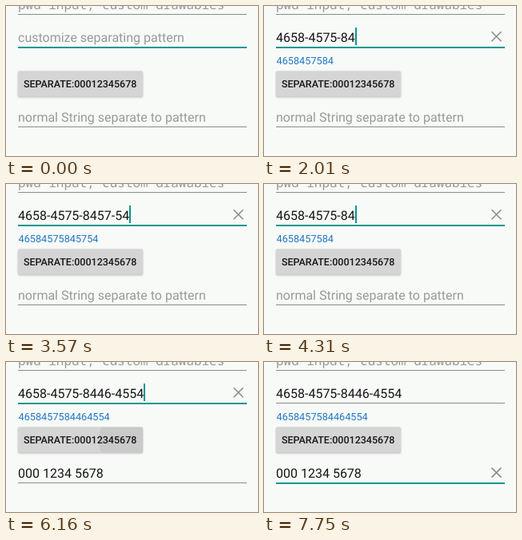
An HTML page that plays this animation: 315 px wide and 188 px high, repeating every 8000 ms.

```html
<!DOCTYPE html>
<html lang="en">
<head>
<meta charset="utf-8">
<title>Separated input</title>
<style>
  html, body { margin: 0; width: 100%; height: 100%; overflow: hidden; background: #f8faf8; }
  svg { display: block; width: 100%; height: 100%; }
  text { font: 16px Roboto, sans-serif; fill: #161616; white-space: pre; text-rendering: geometricPrecision; }
  .hint { fill: #989998; }
  .mono { font-family: "Noto Sans Mono", monospace; font-size: 15.95px; }
  .raw { font-size: 12.7px; fill: #2176c4; }
  .label { font-size: 12.5px; font-weight: 500; }
  .line { fill: #8a8b8a; }
  .line.active, .caret { fill: #0b978d; }
  .clear { stroke: #8c8d8c; stroke-width: 1.6; fill: none; }
  .button { fill: #d4d5d4; filter: drop-shadow(0 1px 1px rgba(0, 0, 0, .26)); }
</style>
</head>
<body>
<svg viewBox="0 0 315 188">
  <defs>
    <clipPath id="buttonClip"><rect x="15" y="81.5" width="156" height="32" rx="1.8"/></clipPath>
  </defs>
  <text class="hint mono" x="15" y="4">pwd input, custom drawables</text>
  <rect class="line" x="15" y="10" width="286" height="1"/>
  <g id="first"></g>
  <text class="raw" id="raw" x="15.6" y="72.6"></text>
  <rect class="button" x="15" y="81.5" width="156" height="32" rx="1.8"/>
  <circle id="ripple" cx="150" cy="98" r="0" fill="#000" opacity=".05" clip-path="url(#buttonClip)"/>
  <text class="label" x="22" y="102.3">SEPARATE:00012345678</text>
  <g id="second"></g>
</svg>
<script>
const LOOP = 8000;
const FOCUS_MOVES = 7270;
const SPLIT_AT = 6160;
const FIRST_ENTRY = "4658457584575454";
const SECOND_ENTRY = "4658457584464554";

// [time, number of digits in the field]
const lengths = [
  [0, 0], [760, 1], [930, 2], [1100, 3], [1320, 4], [1430, 5], [1530, 6], [1640, 7],
  ...Array.from({ length: 9 }, (_, i) => [1790 + i * 102.5, 8 + i]),
  [3380, 15], [3570, 14], [3760, 13], [3930, 12], [4120, 11], [4310, 10],
  [4590, 11], [4720, 12], [4860, 13], [5000, 14], [5060, 15], [5130, 16]
];

// Spans in which each caret shows
const firstCaret = [[70, 600], [760, 3110], [3380, 5660], [6160, 6730]];
const secondCaret = [[FOCUS_MOVES, 7750]];

const byId = id => document.getElementById(id);
const within = (spans, t) => spans.some(([from, to]) => t >= from && t < to);
const valueAt = (steps, t) => steps.findLast(([at]) => t >= at)[1];
const show = (node, on) => node.setAttribute("visibility", on ? "visible" : "hidden");

function makeField(id, hint, baseline, lineY) {
  const group = byId(id);
  const iconY = baseline - 6.7;
  group.innerHTML = `
    <text class="hint" x="15" y="${baseline}">${hint}</text>
    <text class="value" x="15" y="${baseline}"></text>
    <rect class="line" x="15" y="${lineY}" width="286"/>
    <rect class="caret" y="${lineY - 24}" width="2" height="22"/>
    <path class="clear" d="M284.5 ${iconY - 6}l12 12m0 -12l-12 12"/>`;
  const [hintText, value, line, caret, clear] = group.children;
  return (text, focused, caretOn) => {
    value.textContent = text;
    show(hintText, !text);
    line.setAttribute("class", focused ? "line active" : "line");
    line.setAttribute("height", focused ? 2 : 1);
    caret.setAttribute("x", Math.round(15 + (text ? value.getComputedTextLength() : 0)));
    show(caret, caretOn);
    show(clear, focused && text);
  };
}

const drawFirst = makeField("first", "customize separating pattern", 45, 51);
const drawSecond = makeField("second", "normal String separate to pattern", 145.3, 151);

function draw(t) {
  const entry = t < 4400 ? FIRST_ENTRY : SECOND_ENTRY;
  const digits = entry.slice(0, valueAt(lengths, t));
  const grouped = digits.replace(/(\d{4})(?=\d)/g, "$1-");
  const onSecond = t >= FOCUS_MOVES;

  drawFirst(grouped, !onSecond, within(firstCaret, t));
  drawSecond(t >= SPLIT_AT ? "000 1234 5678" : "", onSecond, within(secondCaret, t));
  byId("raw").textContent = digits;

  const spread = Math.min(1, Math.max(0, (t - 5950) / 440));
  byId("ripple").setAttribute("r", onSecond ? 0 : 72 * spread);
}

function tick() {
  draw(performance.now() % LOOP);
  requestAnimationFrame(tick);
}
tick();
</script>
</body>
</html>
```
